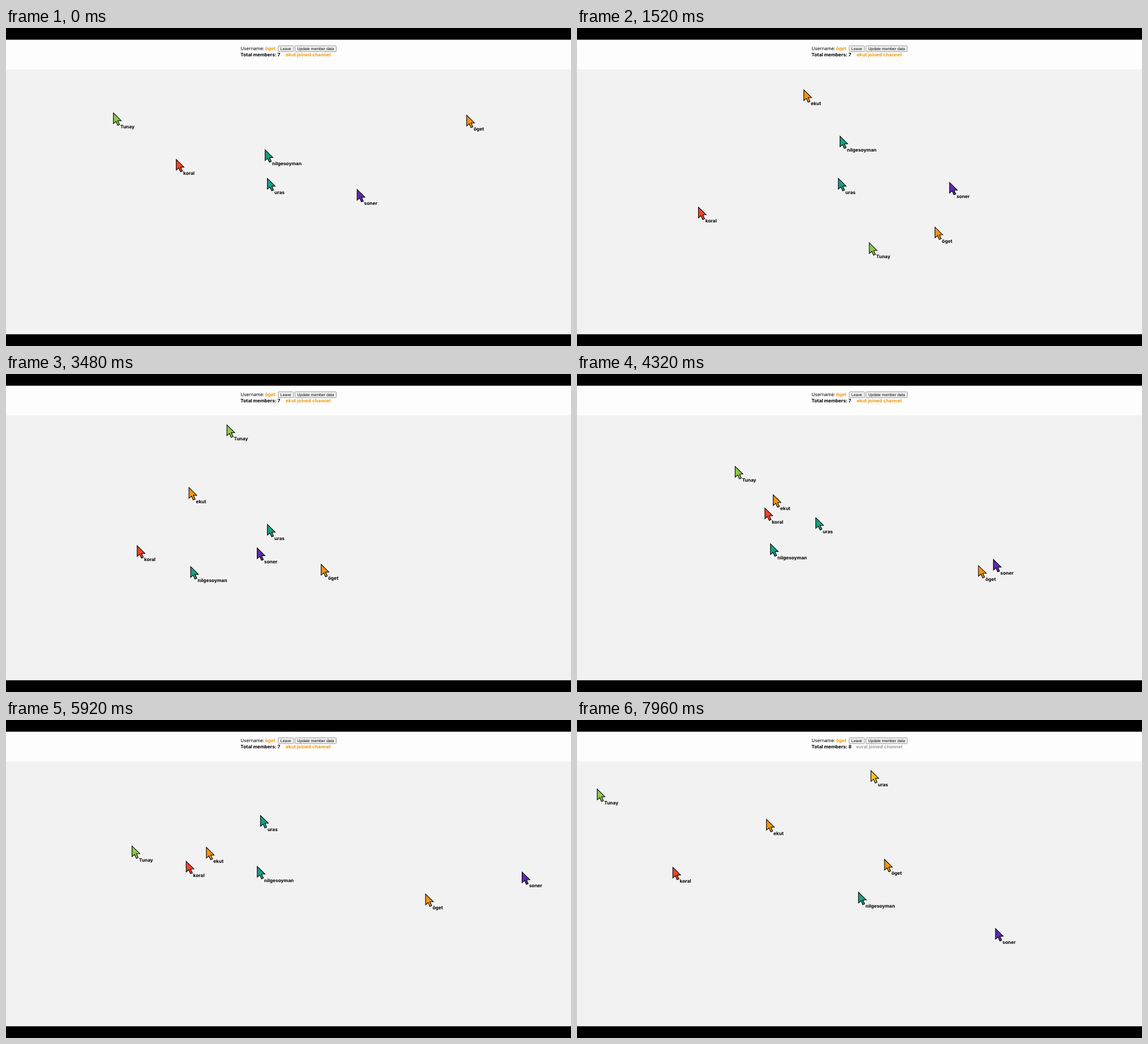
Animation of 998x561 px, one loop 8000 ms. Source, as an HTML page:

```html
<!DOCTYPE html>
<html lang="en">
<head>
<meta charset="utf-8">
<title>Live cursors</title>
<style>
  html, body { margin: 0; width: 100%; height: 100%; overflow: hidden; background: #000; }
  svg { display: block; width: 100%; height: 100%; }
  text { font: 8.1px Inter, sans-serif; text-rendering: geometricPrecision; }
  .bold { font-size: 8.32px; font-weight: 700; }
  .button rect { fill: #efefef; stroke: #767676; stroke-width: .7; }
  .button text { font: 6.93px "Liberation Sans", Arial, sans-serif; text-anchor: middle; }
  .cursor path { stroke: #000; stroke-width: 1.1; }
</style>
</head>
<body>
<svg viewBox="0 0 998 561">
  <clipPath id="page"><rect y="20.8" width="998" height="519.5"/></clipPath>
  <rect width="998" height="561"/>
  <rect y="20.8" width="998" height="519.5" fill="#f2f2f2"/>
  <rect y="20.8" width="998" height="52" fill="#fdfdfd"/>
  <text x="414.3" y="39.1">Username:</text>
  <text x="457.4" y="39.1" class="bold" fill="#f09a10">öget</text>
  <g class="button">
    <rect x="480.8" y="31.4" width="27" height="10.3" rx="1.2"/>
    <text x="494.3" y="39">Leave</text>
    <rect x="510.4" y="31.4" width="73" height="10.3" rx="1.2"/>
    <text x="546.9" y="39">Update member data</text>
  </g>
  <text id="total" x="414.3" y="50" class="bold"></text>
  <text id="notice" x="533.8" y="50" class="bold" text-anchor="middle"></text>
  <g id="cursors" clip-path="url(#page)"></g>
</svg>
<script>
const LOOP = 8000, JOIN = 7760, RECOLOR = 7400;
const TEAL = '#16a085', ORANGE = '#f39510', YELLOW = '#f1c40f';
const ARROW = 'M.7 .9V19.8L5.2 15.9 8.3 22.8 11.6 21.4 8.5 14.6 14.4 14.4Z';

// Every cursor reaches its next stop at these shared moments.
const STOPS = [0, 800, 2280, 3480, 5120, 6760, 7960];

const members = [
  member('Tunay', '#8bcb48',
    [189, 149], [485.5, 373.5], [548, 383], [389.5, 89], [176, 230], [271, 212], [35, 121]),
  member('koral', '#ef4528',
    [300, 231], [221.5, 338.5], [205.5, 290], [231, 302], [424, 174], [203.5, 328], [168.5, 259]),
  member('nilgesoyman', TEAL,
    [457, 214], [409.5, 178.5], [522.5, 202], [325.5, 339], [355.5, 261.5], [537, 253], [496.5, 303]),
  member('soner', '#5e2bae',
    [619.5, 284], [655, 285.5], [660, 256.5], [443, 306], [1005, 345], [810, 184], [738.5, 367]),
  member('öget', ORANGE,
    [813, 153], [584, 333.5], [683, 368.5], [556, 335], [849.5, 339], [623.5, 271], [542.5, 245]),
  member('uras', TEAL,
    [461, 264.5], [461, 264.5], [461, 264.5], [461, 264.5], [384, 241.5], [518.5, 88.5], [518.5, 88.5]),
  member('ekut', ORANGE,
    [450, -30], [411.5, 78], [387.5, 141], [322.5, 199.5], [367.5, 224], [338, 223.5], [334, 174.5])
];

function byId(id) {
  return document.getElementById(id);
}

function add(parent, tag, attrs) {
  const node = document.createElementNS('http://www.w3.org/2000/svg', tag);
  for (const key in attrs) node.setAttribute(key, attrs[key]);
  return parent.appendChild(node);
}

function member(name, color, ...path) {
  const node = add(byId('cursors'), 'g', { class: 'cursor' });
  const arrow = add(node, 'path', { d: ARROW, fill: color });
  add(node, 'text', { x: 13, y: 28.2, class: 'bold' }).textContent = name;
  return { name, path, node, arrow };
}

const recolored = members.find(m => m.name === 'uras');

function draw(t) {
  const joined = t >= JOIN;
  byId('total').textContent = 'Total members: ' + (joined ? 8 : 7);
  byId('notice').textContent = (joined ? 'vural' : 'ekut') + ' joined channel';
  byId('notice').setAttribute('fill', joined ? '#a0a0a0' : '#f09a10');
  recolored.arrow.setAttribute('fill', t < RECOLOR ? TEAL : YELLOW);

  const next = STOPS.findIndex(s => s > t);
  const i = next < 0 ? STOPS.length - 2 : next - 1;
  const u = Math.min(1, (t - STOPS[i]) / (STOPS[i + 1] - STOPS[i]));
  const ease = u * u * (3 - 2 * u);
  for (const { path, node } of members) {
    const [x, y] = path[i].map((from, axis) => from + (path[i + 1][axis] - from) * ease);
    node.setAttribute('transform', `translate(${x} ${y})`);
  }
}

const start = performance.now();
function tick() {
  draw((performance.now() - start) % LOOP);
  requestAnimationFrame(tick);
}
tick();
</script>
</body>
</html>
```
